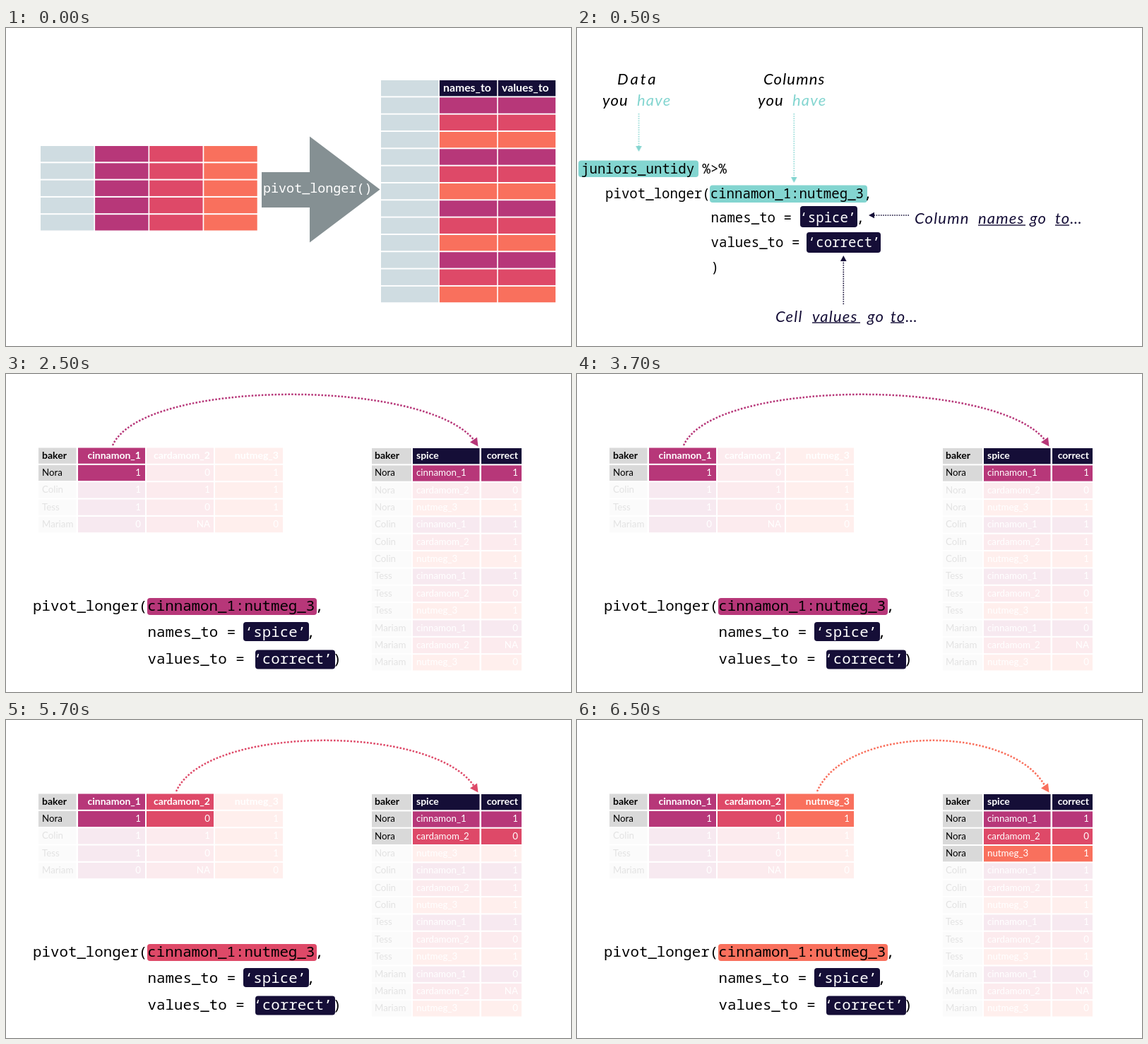
These frames come from a looping animation (800x450 px, 8000 ms). An HTML page:

```html
<!DOCTYPE html>
<html lang="en">
<head>
<meta charset="utf-8">
<title>Pivoting a table longer</title>
<style>
  html, body { margin: 0; width: 100%; height: 100%; overflow: hidden; background: #fff; }
  svg { display: block; width: 100%; height: 100%; }
  text { white-space: pre; }
  .mono { font-family: "Noto Sans Mono", "DejaVu Sans Mono", monospace; }
  .sans { font-family: Lato, "Open Sans", sans-serif; }
  .hand { font: italic 400 22px Lato, "Open Sans", sans-serif; letter-spacing: 1.2px; }
</style>
</head>
<body>
<svg id="stage" viewBox="0 0 800 450"></svg>
<script>
const LOOP = 8000;
const NAVY = '#150e37', TEAL = '#83d5d0', GREY = '#d9d9d9', MIST = '#cfdce1';
const HUES = ['#b73779', '#de4968', '#f9705d'];
const FADED = 0.11;
const stage = document.getElementById('stage');

function add(parent, tag, attrs, content) {
  const el = document.createElementNS('http://www.w3.org/2000/svg', tag);
  for (const key in attrs) el.setAttribute(key, attrs[key]);
  if (content !== undefined) el.textContent = content;
  return parent.appendChild(el);
}

const box = (g, x1, y1, x2, y2, fill, rx = 0) =>
  add(g, 'rect', { x: x1, y: y1, width: x2 - x1, height: y2 - y1, fill, rx });

const sans = (g, x, y, str, size, fill, bold, anchor = 'start') =>
  add(g, 'text', { class: 'sans', x, y, fill, 'font-size': size,
    'font-weight': bold ? 700 : 400, 'text-anchor': anchor }, str);

const hand = (g, x, y, str, fill) => add(g, 'text', { class: 'hand', x, y, fill }, str);

// Each part is a string (black) or a [string, colour] pair.
function code(g, x, y, size, ...parts) {
  const line = add(g, 'text', { class: 'mono', x, y, 'font-size': size });
  for (const part of parts) {
    const [str, fill] = Array.isArray(part) ? part : [part, '#000'];
    add(line, 'tspan', { fill }, str);
  }
}

// Shows a scene only between two times of the loop, with hard cuts.
function scene(from, to) {
  const g = add(stage, 'g', {});
  const steps = [0, from, to, LOOP].filter((t, i, all) => t !== all[i - 1]);
  const frames = steps.map(t => ({
    offset: t / LOOP,
    opacity: t >= from && t < to || t === LOOP && to === LOOP ? 1 : 0,
    easing: 'steps(1, end)'
  }));
  g.animate(frames, { duration: LOOP, iterations: Infinity });
  return g;
}

function overview(g) {
  const fills = [MIST, ...HUES];
  for (let r = 0; r < 5; r++) {
    fills.forEach((fill, c) => {
      const x = 49 + c * 77.1, y = 167 + r * 24.3;
      box(g, x, y, x + 75.4, y + 22.3, fill);
    });
  }
  add(g, 'path', { d: 'M362 204H430V153.5L529.5 228.5L430 303.5V254H362Z', fill: '#859093' });
  code(g, 364, 233, 18.4, ['pivot_longer()', '#fff']);

  for (let r = 0; r < 13; r++) {
    for (let c = 0; c < 3; c++) {
      const x = 531 + c * 82.9, y = 74 + r * 24.32;
      const fill = c === 0 ? MIST : r === 0 ? NAVY : HUES[(r - 1) % 3];
      box(g, x, y, x + 81.3, y + 22.4, fill);
    }
  }
  sans(g, 619, 90, 'names_to', 15.8, '#fff', true);
  sans(g, 702, 90, 'values_to', 15.8, '#fff', true);
}

function dottedArrow(g, x1, y1, x2, y2, color) {
  const len = Math.hypot(x2 - x1, y2 - y1);
  const angle = Math.atan2(y2 - y1, x2 - x1) * 180 / Math.PI;
  const a = add(g, 'g', { transform: `translate(${x1} ${y1}) rotate(${angle})` });
  add(a, 'path', { d: `M0 0H${len - 8}`, stroke: color, 'stroke-width': 1.6, 'stroke-dasharray': '1.6 1.6' });
  add(a, 'path', { d: `M${len} 0l-8 -4.3v8.6z`, fill: color });
}

function syntax(g) {
  const size = 19.07;
  hand(g, 57, 80, 'Data', '#000').style.letterSpacing = '3px';
  hand(g, 264, 80, 'Columns', '#000');
  for (const x of [36, 256]) {
    hand(g, x, 110, 'you', '#000');
    hand(g, x + 49, 110, 'have', TEAL);
  }
  dottedArrow(g, 87.5, 121, 87.5, 175, TEAL);
  dottedArrow(g, 307.3, 121, 307.3, 219, TEAL);

  box(g, 2, 187.5, 172, 211, TEAL, 4);
  box(g, 188, 222.5, 411, 247, TEAL, 4);
  box(g, 316, 252, 397, 282, NAVY, 4);
  box(g, 325, 289, 430, 318, NAVY, 4);
  code(g, 6, 206, size, 'juniors_untidy %>%');
  code(g, 40, 240.5, size, 'pivot_longer(cinnamon_1:nutmeg_3,');
  code(g, 189.5, 275, size, 'names_to = ', ['‘spice’', '#fff'], ',');
  code(g, 189.5, 309.5, size, 'values_to = ', ['‘correct’', '#fff']);
  code(g, 189.5, 344.5, size, ')');

  dottedArrow(g, 470, 265, 413, 265, NAVY);
  dottedArrow(g, 377.3, 391, 377.3, 322, NAVY);
  const note = (y, words) => words.forEach(([x, str]) => hand(g, x, y, str, NAVY));
  note(277, [[478, 'Column'], [568, 'names'], [641, 'go'], [677, 'to…']]);
  note(415.5, [[281, 'Cell'], [333, 'values'], [411, 'go'], [444, 'to…']]);
  for (const [x1, x2, y] of [[568, 635, 279], [677, 697, 279], [333, 401, 417], [444, 463, 417]])
    box(g, x1, y - 0.7, x2, y + 0.7, NAVY);
}

const SPICES = ['cinnamon_1', 'cardamom_2', 'nutmeg_3'];
const SCORES = [
  ['Nora', 1, 0, 1],
  ['Colin', 1, 1, 1],
  ['Tess', 1, 0, 1],
  ['Mariam', 0, 'NA', 0]
];
const PITCH = 24.35;

// Columns: [left, right, text x, anchor]
const WIDE = [[46, 99.5, 51, 'start'], [102, 197, 191, 'end'], [199, 294, 289, 'end'], [296, 392, 386, 'end']];
const LONG = [[518, 574, 522, 'start'], [576, 670.5, 581, 'start'], [673, 730, 725, 'end']];

function cell(g, col, top, row, str, fill, lit) {
  const [x1, x2, tx, anchor] = col;
  const y = top + row * PITCH;
  const head = row === 0;
  const c = add(g, 'g', { opacity: lit ? 1 : FADED });
  box(c, x1, y, x2, y + 22.3, fill);
  // White labels stay white when the cell is dimmed.
  const ink = fill === GREY ? '#000' : '#fff';
  sans(ink === '#fff' ? g : c, tx, y + 15, str, head ? 14 : 13.3, ink, head, anchor);
}

function pivot(g, step) {
  cell(g, WIDE[0], 104.5, 0, 'baker', GREY, true);
  SPICES.forEach((name, i) => cell(g, WIDE[i + 1], 104.5, 0, name, HUES[i], i <= step));
  ['baker', 'spice', 'correct'].forEach((name, i) =>
    cell(g, LONG[i], 105, 0, name, i ? NAVY : GREY, true));

  SCORES.forEach(([who, ...vals], r) => {
    cell(g, WIDE[0], 104.5, r + 1, who, GREY, r === 0);
    vals.forEach((val, i) => {
      const lit = r === 0 && i <= step;
      const row = r * 3 + i + 1;
      cell(g, WIDE[i + 1], 104.5, r + 1, val, HUES[i], lit);
      cell(g, LONG[0], 105, row, who, GREY, lit);
      cell(g, LONG[1], 105, row, SPICES[i], HUES[i], lit);
      cell(g, LONG[2], 105, row, val, HUES[i], lit);
    });
  });

  const hue = HUES[step];
  const x = [151, 241, 340][step];
  add(g, 'path', { d: `M${x} 101C${x + 42} 6 ${595 + step * 10} 6 663 94`, fill: 'none',
    stroke: hue, 'stroke-width': 2.5, 'stroke-dasharray': '2.5 2.2' });
  add(g, 'path', { d: 'M668.5 102.5L657 96.5L667 89.5Z', fill: hue });

  const size = 20.8;
  box(g, 200, 317, 440, 341, hue, 4);
  box(g, 336, 351, 429, 378, NAVY, 4);
  box(g, 353, 390.5, 466, 417.5, NAVY, 4);
  code(g, 38, 334.5, size, 'pivot_longer(cinnamon_1:nutmeg_3,');
  code(g, 200.5, 372, size, 'names_to = ', ['‘spice’', '#fff'], ',');
  code(g, 200.5, 410, size, 'values_to = ', ['‘correct’', '#fff'], ')');
}

overview(scene(0, 500));
syntax(scene(500, 2500));
[2500, 4500, 6500].forEach((t, i) => pivot(scene(t, Math.min(t + 2000, LOOP)), i));
</script>
</body>
</html>
```
